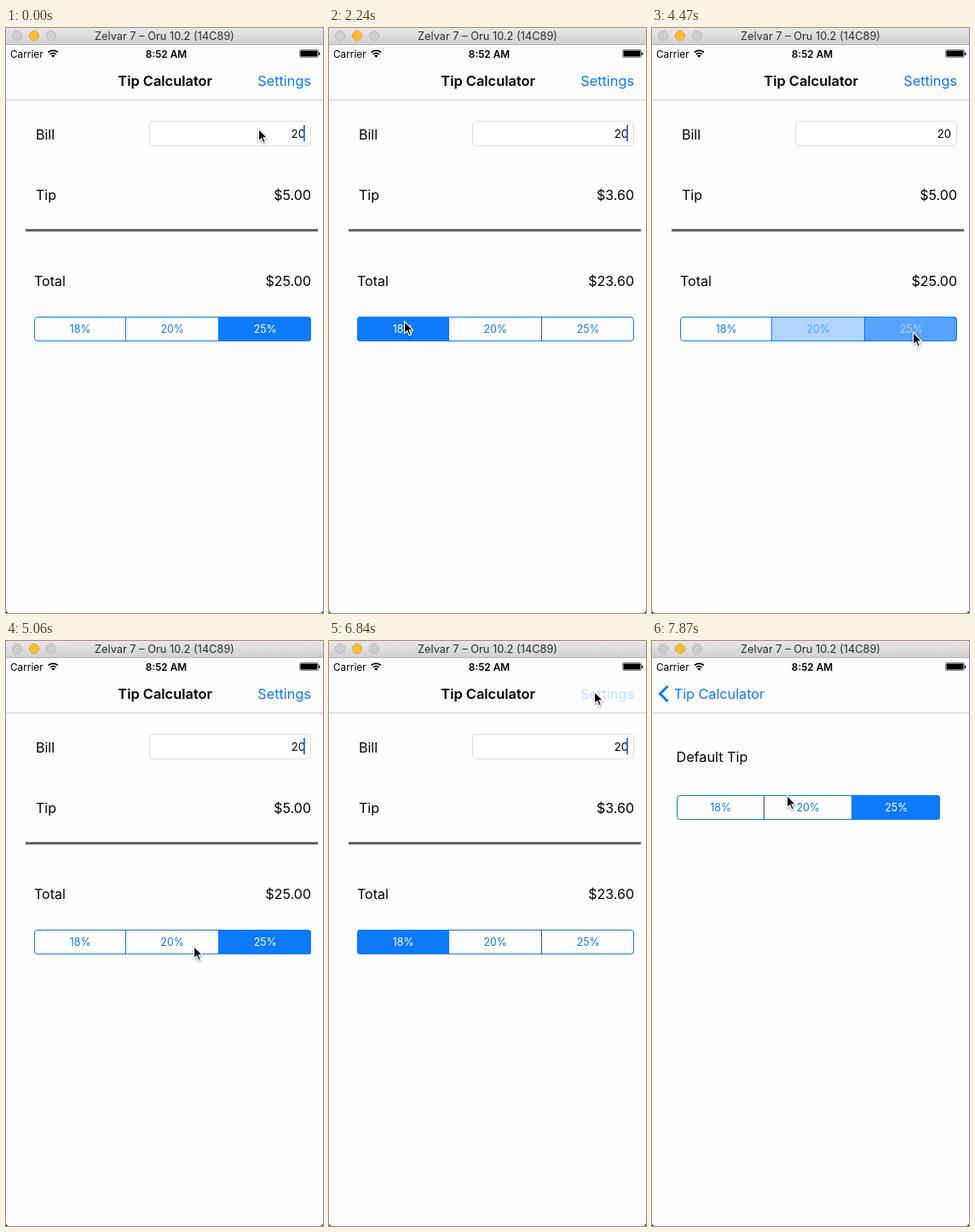
An HTML page that plays this animation: 372x687 px, repeating every 8000 ms.

```html
<!DOCTYPE html>
<html lang="en">
<head>
<meta charset="utf-8">
<title>Tip calculator</title>
<style>
  html, body { margin: 0; width: 100%; height: 100%; overflow: hidden; background: #fff; }
  svg { display: block; width: 372px; height: 687px; font: 16px Inter, sans-serif; }
  .mid { text-anchor: middle; }
  .end { text-anchor: end; }
  .bold { font-weight: 600; }
  .blue { fill: #0d79fb; }
  .seg { font-size: 12.4px; text-anchor: middle; }
</style>
</head>
<body>
<svg viewBox="0 0 372 687">
  <defs>
    <linearGradient id="chrome" x2="0" y2="1">
      <stop stop-color="#e9e7e9"/><stop offset="1" stop-color="#d1d0d1"/>
    </linearGradient>
  </defs>
  <rect width="372" height="687" fill="#fefefe"/>

  <g id="bill">
    <text x="35" y="131">Bill</text>
    <rect x="168.5" y="109.5" width="189" height="29" rx="4" fill="#fff" stroke="#e0e0e0"/>
    <text class="end" x="351" y="129" font-size="13.2">20</text>
    <rect id="caret" x="349" y="114" width="2" height="19" fill="#4a6de0"/>
    <text x="35" y="202">Tip</text>
    <text id="tip" class="end" x="358" y="202"></text>
    <rect x="23" y="236" width="343" height="3" fill="#666"/>
    <text x="33" y="303">Total</text>
    <text id="total" class="end" x="358" y="303"></text>
  </g>
  <rect id="dim" width="372" height="687"/>
  <g id="settings">
    <rect y="85" width="372" height="602" fill="#fefefe"/>
    <text x="28.5" y="142" font-size="16.2">Default Tip</text>
  </g>

  <rect y="20" width="372" height="64" fill="#fdfdfd"/>
  <rect y="84" width="372" height="1" fill="#cdcdcd"/>
  <text id="title" class="mid bold" y="68" font-size="16.4">Tip Calculator</text>
  <text id="open" class="end blue" x="358" y="68" font-size="16.3">Settings</text>
  <g id="back" class="blue">
    <path d="M18.5 53L9.5 62l9 9" fill="none" stroke="#0d79fb" stroke-width="3"/>
    <text id="backLabel" y="68" font-size="16.2">Tip Calculator</text>
  </g>

  <rect width="372" height="20" fill="url(#chrome)"/>
  <rect y="19" width="372" height="1" fill="#b4b3b4"/>
  <g fill="#d0cfd0" stroke="#bbb9bb">
    <circle cx="13" cy="9" r="5.5"/>
    <circle cx="33" cy="9" r="5.5" fill="#fdbf2d" stroke="#e0a32c"/>
    <circle cx="53" cy="9" r="5.5"/>
  </g>
  <text class="mid" x="186" y="14" font-size="12.8" fill="#2e2e2e">Zelvar 7 – Oru 10.2 (14C89)</text>
  <text x="5" y="34.5" font-size="11.8">Carrier</text>
  <g fill="none" stroke="#000" stroke-width="1.7">
    <path d="M49.7 28.7a8 8 0 0 1 11.2 0M51.9 31a5 5 0 0 1 6.8 0"/>
  </g>
  <path d="M53.2 32.6a3 3 0 0 1 4.2 0l-2.1 2.2z"/>
  <text class="mid bold" x="188" y="34.5" font-size="11.8">8:52 AM</text>
  <rect x="344.5" y="25.5" width="22" height="9" rx="1.5" fill="none" stroke="#8a8a8a"/>
  <rect x="345.5" y="26.5" width="20" height="7" rx=".7"/>
  <path d="M367 28.5q1.5 0 1.5 1.8t-1.5 1.8z"/>
  <path d="M0 683v4h4q-4 0-4-4zM372 683v4h-4q4 0 4-4z" fill="#222"/>

  <path id="cursor" d="M0 0V14.2l3.3-3 2.3 5.3 2.4-1-2.3-5.2h4.4z" stroke="#fff" stroke-width="1.2"
    style="filter: drop-shadow(0 1px 1px #0006)"/>
</svg>
<script>
const LOOP = 8000, STEP = 148.5, FADE = 300;
const BLUE = '#0d79fb', DARK = '#4a5560';
const RATES = [18, 20, 25];
const TAPS = [[-FADE, 2], [1630, 0], [3115, 1], [4250, 2], [5209, 0]];   // time, segment
const PUSH = { start: 7000, length: 420 };
// step, x, y of the pointer
const PATH = [
  [0, 296, 118], [4, 296, 118], [5, 250, 165], [6, 174, 246], [7, 174, 246],
  [8, 140, 290], [10, 88, 344], [16, 88, 344], [18, 130, 357], [20, 176, 355],
  [25, 176, 355], [27, 235, 369], [29, 306, 357], [32, 306, 357], [34, 220, 358],
  [36, 84.5, 355], [38, 84.5, 355], [40, 262, 128], [42, 302, 75], [44, 311, 59],
  [51, 311, 59], [53, 158, 181], [54, 158, 181]
];

const $ = id => document.getElementById(id);
const clamp = v => Math.min(1, Math.max(0, v));
const lerp = (a, b, p) => a + (b - a) * p;

function add(parent, tag, attrs, text = '') {
  const el = document.createElementNS('http://www.w3.org/2000/svg', tag);
  for (const name in attrs) el.setAttribute(name, attrs[name]);
  el.textContent = text;
  return parent.appendChild(el);
}

// Three-part control; returns a function that sets how far each part is selected.
function segmented(parent, y, edges) {
  const x = edges[0], width = edges[3] - x, id = 'clip' + y;
  const frame = { x: x + .5, y: y + .5, width: width - 1, height: 28, rx: 3.5 };
  add(add(parent, 'clipPath', { id }), 'rect', { ...frame, x, y, width, height: 29 });
  const fills = add(parent, 'g', { 'clip-path': `url(#${id})`, fill: BLUE });
  const parts = RATES.map((rate, i) => ({
    fill: add(fills, 'rect', { x: edges[i], y, width: edges[i + 1] - edges[i], height: 29 }),
    label: add(parent, 'text', { class: 'seg', x: (edges[i] + edges[i + 1]) / 2 + .7, y: y + 19 }, rate + '%')
  }));
  add(parent, 'rect', { ...frame, fill: 'none', stroke: BLUE });
  const lines = [1, 2].map(i => add(parent, 'rect', { x: edges[i], y, width: 1, height: 29 }));
  return (levels, darkLine) => {
    parts.forEach(({ fill, label }, i) => {
      fill.setAttribute('opacity', levels[i]);
      label.setAttribute('fill', `color-mix(in srgb, #fff ${levels[i] * 100}%, ${BLUE})`);
    });
    lines.forEach((line, i) => line.setAttribute('fill', i === darkLine ? DARK : BLUE));
  };
}

const setRate = segmented($('bill'), 339, [33, 140, 249, 358]);
segmented($('settings'), 181, [29, 131, 234, 338])([0, 0, 1], 0);

function drawRate(t) {
  const n = TAPS.findLastIndex(tap => tap[0] <= t);
  const [time, chosen] = TAPS[n];
  const p = clamp((t - time) / FADE);
  const levels = [0, 0, 0];
  if (n) levels[TAPS[n - 1][1]] = 1 - p;
  levels[chosen] = p;
  setRate(levels, chosen === 0 ? 1 : -1);
  const tip = 20 * RATES[chosen] / 100;
  $('tip').textContent = '$' + tip.toFixed(2);
  $('total').textContent = '$' + (20 + tip).toFixed(2);
}

function drawCaret(t) {
  const phase = t % 1000;
  const level = phase < 600 ? 1 - (phase - 250) / 170 : (phase - 700) / 130;
  $('caret').setAttribute('opacity', clamp(level));
}

function drawPush(t) {
  const p = 1 - (1 - clamp((t - PUSH.start) / PUSH.length)) ** 3;
  $('bill').setAttribute('transform', `translate(${-112 * p})`);
  $('settings').setAttribute('transform', `translate(${372 * (1 - p)})`);
  $('dim').setAttribute('opacity', p < 1 ? .08 * p : 0);
  $('title').setAttribute('x', lerp(186.7, 79, p));
  $('title').setAttribute('opacity', 1 - p);
  $('backLabel').setAttribute('x', lerp(132, 25.7, p));
  $('back').setAttribute('opacity', p);
  $('open').setAttribute('opacity', (t >= 46 * STEP ? .22 : 1) * (1 - p));
}

function drawCursor(step) {
  const i = PATH.findIndex(point => point[0] > step);
  const [a, b] = [PATH[i - 1], PATH[i]];
  const p = (step - a[0]) / (b[0] - a[0]);
  $('cursor').setAttribute('transform', `translate(${lerp(a[1], b[1], p) + .5} ${lerp(a[2], b[2], p) + .5})`);
}

// The picture advances in even steps, so time is snapped to them.
function draw(now) {
  const step = Math.min(53, Math.floor(now % LOOP / STEP + .05));
  const t = step * STEP;
  drawRate(t);
  drawCaret(t);
  drawPush(t);
  drawCursor(step);
  requestAnimationFrame(() => draw(performance.now()));
}
draw(0);
</script>
</body>
</html>
```
